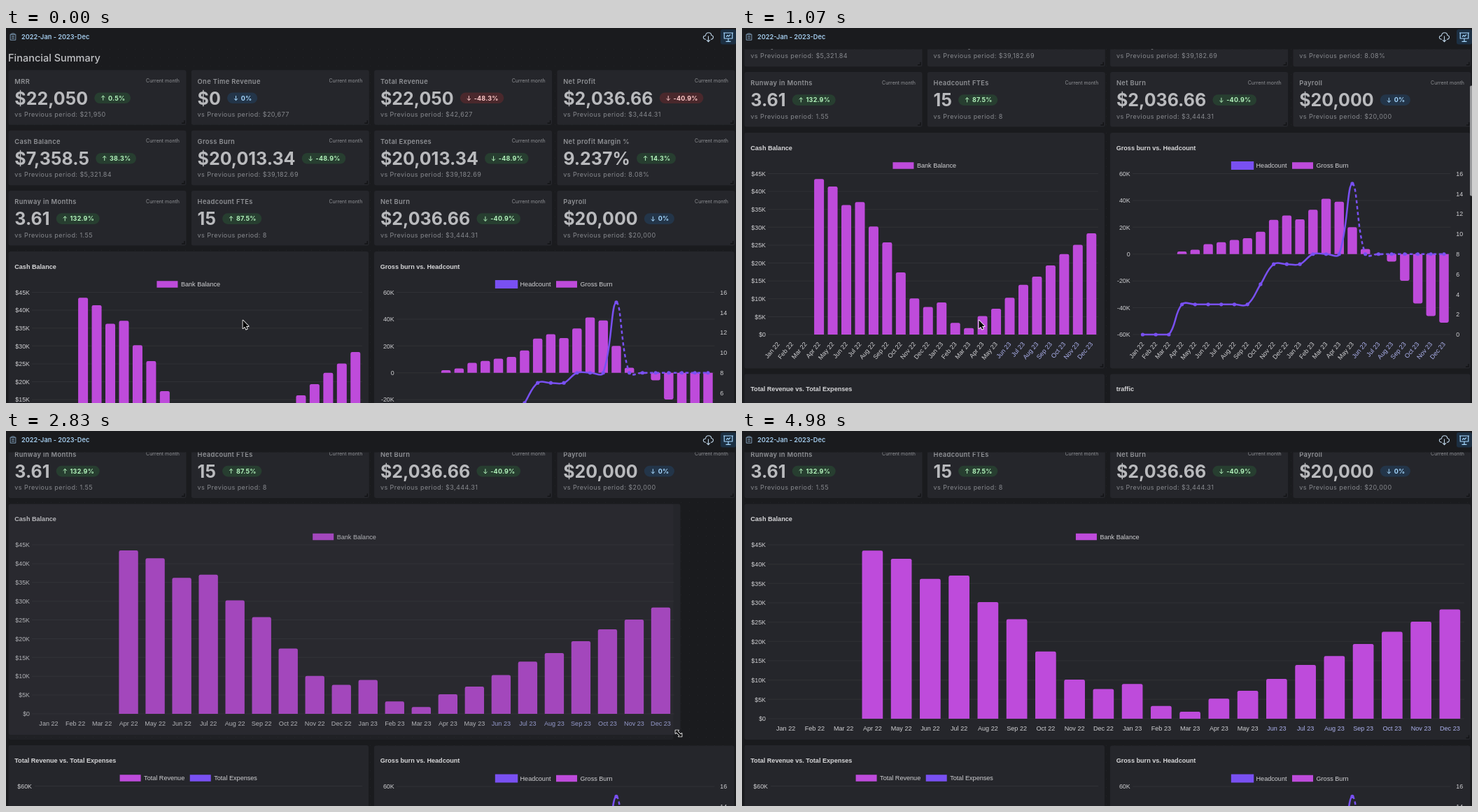
An HTML page with a canvas for the animation above (5540 ms loop, 1043x537 px).

```html
<!DOCTYPE html>
<html lang="en">
<head>
<meta charset="utf-8">
<title>Financial Summary</title>
<style>
  html, body { margin: 0; width: 100%; height: 100%; overflow: hidden; background: #1a1b1e; }
  canvas { display: block; width: 1043px; height: 537px; }
</style>
</head>
<body>
<canvas></canvas>
<script>
const W = 1043, H = 537, LOOP = 5540;
const GRAPE = '#be4bdb', VIOLET = '#7950f2', CARD = '#25262b', BG = '#1a1b1e';
const UI = 'Inter, sans-serif', CHART = '"Liberation Sans", Arial, sans-serif';
const COL = 87.1, GAP = 8, LEFT = 3.5, HEADER = 30.5, CHART_H = 337.5;

const canvas = document.querySelector('canvas');
const ctx = canvas.getContext('2d');
const dpr = window.devicePixelRatio || 1;
canvas.width = W * dpr;
canvas.height = H * dpr;

// Each step overrides only what changes at its start time.
const STEPS = [
  [0, { scroll: 0, bar: false, cursor: 'arrow', cx: 338.5, cy: 418.6, right: 518, height: CHART_H, active: false, push: 0 }],
  [540, { scroll: 2 }],
  [720, { scroll: 45, bar: true }],
  [890, { scroll: 107 }],
  [1070, { scroll: 170 }],
  [1250, { scroll: 203 }],
  [1430, { scroll: 215.5, cx: 474, cy: 452.6 }],
  [1610, { cx: 490.8, cy: 438.8 }],
  [1790, { cursor: 'resize', cx: 510, cy: 440 }],
  [1960, { bar: false }],
  [2140, { cx: 524, cy: 440, right: 531, active: true }],
  [2310, { cx: 702, cy: 438, right: 709.3, height: 335.5, push: 326.5 }],
  [2480, { push: 346 }],
  [2660, { cx: 922, cy: 447, right: 927, height: 344 }],
  [2830, { cx: 961, cy: 433, right: 963.5, height: 330.5 }],
  [3010, { cx: 997, cy: 439, right: 996 }],
  [3190, { cx: 1027, cy: 444, right: 1033, height: 337 }],
  [3370, { cx: 1030, cy: 445, right: 1036.3, height: CHART_H }],
  [4090, { cy: 440 }],
  [4270, { right: 1041, active: false }],
  [4810, { cursor: 'arrow', cx: 1026, cy: 468.8 }],
  [4980, { cursor: 'none' }],
];

const KPIS = [
  ['MRR', '$22,050', '↑', '0.5%', 'green', '$21,950'],
  ['One Time Revenue', '$0', '↓', '0%', 'blue', '$20,677'],
  ['Total Revenue', '$22,050', '↓', '-48.3%', 'red', '$42,627'],
  ['Net Profit', '$2,036.66', '↓', '-40.9%', 'red', '$3,444.31'],
  ['Cash Balance', '$7,358.5', '↑', '38.3%', 'green', '$5,321.84'],
  ['Gross Burn', '$20,013.34', '↓', '-48.9%', 'green', '$39,182.69'],
  ['Total Expenses', '$20,013.34', '↓', '-48.9%', 'green', '$39,182.69'],
  ['Net profit Margin %', '9.237%', '↑', '14.3%', 'green', '8.08%'],
  ['Runway in Months', '3.61', '↑', '132.9%', 'green', '1.55'],
  ['Headcount FTEs', '15', '↑', '87.5%', 'green', '8'],
  ['Net Burn', '$2,036.66', '↓', '-40.9%', 'green', '$3,444.31'],
  ['Payroll', '$20,000', '↓', '0%', 'blue', '$20,000'],
];
const PILL = {
  green: ['#273e30', '#b2f2bb'],
  blue: ['#233549', '#a5d8ff'],
  red: ['#4a282c', '#ffc9c9'],
};
const MONTHS = 'Jan Feb Mar Apr May Jun Jul Aug Sep Oct Nov Dec'.split(' ');
const LABELS = [22, 23].flatMap(year => MONTHS.map(m => `${m} ${year}`));
const FORECAST = 17;
const BALANCE = [0, 0, 0, 43.5, 41.4, 36.2, 37.05, 30.2, 25.75, 17.4, 10.1, 7.7,
  9, 3.3, 1.8, 5.2, 7.25, 10.3, 13.9, 16.2, 19.35, 22.5, 25.1, 28.3];
const BURN = [0, 0, 0, 2, 3.3, 7.4, 8.8, 10.6, 11.8, 16.6, 25.5, 28.7,
  25.9, 33, 41.3, 39, 20, 3.8, -0.8, -5.6, -19.9, -36.8, -46.2, -51.1];
const HEADCOUNT = [0, 0, 0, 3, 3, 3, 3, 3, 3, 5, 7, 7, 7, 8, 8, 8, 15, 8, 8, 8, 8, 8, 8, 8];

// y is the middle of the capital letters.
function text(str, x, y, size, color, { weight = 400, font = UI, align = 'left', spacing = 0 } = {}) {
  ctx.font = `${weight} ${size}px ${font}`;
  ctx.letterSpacing = `${spacing}px`;
  ctx.textAlign = align;
  ctx.fillStyle = color;
  ctx.fillText(str, x, y + size * 0.36);
  return ctx.measureText(str).width;
}

function box(x, y, w, h, color, radius = 0) {
  ctx.fillStyle = color;
  ctx.beginPath();
  ctx.roundRect(x, y, w, h, radius);
  ctx.fill();
}

function stroke(path, color, width = 1) {
  ctx.strokeStyle = color;
  ctx.lineWidth = width;
  ctx.stroke(new Path2D(path));
}

function card(x, y, w, h) {
  box(x, y, w, h, CARD, 3);
  const r = x + w - 2.5, b = y + h - 2.5;
  stroke(`M${r} ${b - 4}V${b}H${r - 4}`, 'rgba(0,0,0,.5)', 1.5);
}

function kpi([label, value, arrow, change, tone, previous], x, y) {
  card(x, y, 254, 78.5);
  text(label, x + 8.8, y + 16, 9.3, '#909296', { weight: 600, spacing: 0.36 });
  text('Current month', x + 244.5, y + 15, 7, '#909296', { align: 'right' });
  const width = text(value, x + 8.8, y + 40.2, 25, '#b9babd', { weight: 700 });
  const [fill, ink] = PILL[tone];
  const px = x + width + 18;
  ctx.font = `700 9px ${UI}`;
  ctx.letterSpacing = '.2px';
  box(px, y + 32.2, ctx.measureText(change).width + 27.5, 15.6, fill, 7.8);
  const ax = px + 12.5, ay = y + 40, d = arrow === '↑' ? -1 : 1;
  stroke(`M${ax} ${ay - 3.3 * d}V${ay + 3.3 * d}M${ax - 2.6} ${ay + 0.8 * d}L${ax} ${ay + 3.3 * d}L${ax + 2.6} ${ay + 0.8 * d}`, ink);
  text(change, px + 19.8, ay, 9, ink, { weight: 700, spacing: 0.2 });
  text(`vs Previous period: ${previous}`, x + 8.8, y + 63.5, 9, '#87898e', { spacing: 0.45 });
}

function legend(cx, y, items) {
  ctx.font = `9.1px ${CHART}`;
  ctx.letterSpacing = '0px';
  const widths = items.map(([name]) => ctx.measureText(name).width + 34.5);
  let x = cx - (widths.reduce((a, b) => a + b) + 7.5 * (items.length - 1)) / 2;
  items.forEach(([name, color, grow = 0], i) => {
    box(x - grow, y - 4.7 - grow, 30 + 2 * grow, 9.4 + 2 * grow, color);
    text(name, x + 34.5, y, 9.1, '#d0d0d3', { font: CHART });
    x += widths[i] + 7.5;
  });
}

function chartCard(x, y, w, h, title, items) {
  card(x, y, w, h);
  text(title, x + 8.7, y + 21.7, 9.1, '#d6d6d8', { weight: 700, font: CHART });
  legend(x + w / 2, y + 47, items);
}

function gridLine(label, x, y, from, to) {
  box(from, y - 0.5, to - from, 1, 'rgba(255,255,255,.05)');
  text(label, x, y, 8.9, '#cfcfd2', { font: CHART, align: 'right' });
}

function bars(values, left, step, zero, scale) {
  values.forEach((v, i) => {
    if (!v) return;
    const h = Math.abs(v) * scale, r = Math.min(2.4, h);
    box(left + (i + 0.14) * step, v > 0 ? zero - h : zero, step * 0.72, h, GRAPE, v > 0 ? [r, r, 0, 0] : [0, 0, r, r]);
  });
}

function labelAngle(step) {
  return step > 31.6 ? 0 : Math.min(50 * Math.PI / 180, Math.asin(15.5 / step));
}

function monthLabels(left, step, y) {
  const angle = labelAngle(step);
  LABELS.forEach((label, i) => {
    ctx.save();
    ctx.translate(left + (i + 0.5) * step, y + (angle ? 11.8 : 14));
    ctx.rotate(-angle);
    text(label, 0, 0, 9.1, i < FORECAST ? '#d0d0d3' : '#adb2ee', { font: CHART, align: angle ? 'right' : 'center' });
    ctx.restore();
  });
}

function cashChart(y, right, height) {
  chartCard(LEFT, y, right - LEFT, height, 'Cash Balance', [['Bank Balance', GRAPE]]);
  const left = 42, end = right - 9, step = (end - left) / 24;
  const top = y + 58.5, zero = y + height - 30 - 24.1 * Math.sin(labelAngle(step));
  for (let k = 0; k <= 45; k += 5) {
    gridLine(k ? `$${k}K` : '$0', 34, zero + (top - zero) * k / 45, 37, end);
  }
  bars(BALANCE, left, step, zero, (zero - top) / 45);
  monthLabels(left, step, zero);
}

function smoothLine(points, floor) {
  const controls = points.map((p, i) => {
    const a = points[i - 1] || p, b = points[i + 1] || p;
    const before = Math.hypot(p[0] - a[0], p[1] - a[1]);
    const after = Math.hypot(b[0] - p[0], b[1] - p[1]);
    const t = 0.4 / (before + after);
    const at = k => [p[0] + k * (b[0] - a[0]), Math.min(floor, p[1] + k * (b[1] - a[1]))];
    return [at(-t * before), at(t * after)];
  });
  ctx.strokeStyle = VIOLET;
  ctx.lineWidth = 2.5;
  const run = (from, to, dash) => {
    ctx.setLineDash(dash);
    ctx.beginPath();
    ctx.moveTo(...points[from]);
    for (let i = from + 1; i <= to; i++) {
      ctx.bezierCurveTo(...controls[i - 1][1], ...controls[i][0], ...points[i]);
    }
    ctx.stroke();
    ctx.setLineDash([]);
  };
  run(0, FORECAST - 1, []);
  run(FORECAST - 1, points.length - 1, [4.6, 3.8]);
  points.forEach(([x, y]) => box(x - 2.6, y - 2.6, 5.2, 5.2, VIOLET, 2.6));
}

function burnChart(y) {
  chartCard(526, y, 514.5, CHART_H, 'Gross burn vs. Headcount', [['Headcount', VIOLET, 1.2], ['Gross Burn', GRAPE]]);
  const left = 563.1, step = 18.72, end = left + 24 * step;
  const top = y + 58.5, bottom = y + 289, mid = (top + bottom) / 2, unit = (bottom - top) / 16;
  for (let k = -60; k <= 60; k += 20) {
    gridLine(k ? `${k}K` : '0', 554.7, mid - k * (bottom - top) / 120, 558, end);
  }
  for (let n = 0; n <= 16; n += 2) {
    text(n, 1020.3, bottom - n * unit, 8.9, '#cfcfd2', { font: CHART });
  }
  bars(BURN, left, step, mid, (bottom - top) / 120);
  smoothLine(HEADCOUNT.map((n, i) => [left + (i + 0.5) * step, bottom - n * unit]), bottom);
  monthLabels(left, step, bottom);
}

function lowerRow(y, showTraffic) {
  chartCard(LEFT, y, 514.5, CHART_H, 'Total Revenue vs. Total Expenses', [['Total Revenue', GRAPE], ['Total Expenses', VIOLET]]);
  gridLine('$60K', 37, y + 58.5, 41, 509);
  if (!showTraffic) return;
  chartCard(526, y, 514.5, CHART_H, 'traffic', [['Traffic by Referral', GRAPE]]);
  gridLine('600', 551, y + 58.5, 555, 1031);
  gridLine('500', 551, y + 82.5, 555, 1031);
  box(620.7, y + 69.3, 14.2, 200, GRAPE, 2.4);
}

function backdrop() {
  box(0, 0, W, H, BG);
  for (let y = 30; y < H; y += 12) {
    for (let x = 4; x < W; x += 12) box(x, y, 1, 1, '#222327');
  }
}

function header() {
  box(0, 0, W, HEADER - 4.5, BG);
  text('2022-Jan - 2023-Dec', 22, 13, 9.2, '#a5cdee', { weight: 600 });
  stroke('M7.5 9H6.2V17.2H13.8V9H12.5M8 8H12V10H8ZM8 12.5H12M8 14.8H12', '#7f9db8');
  stroke('M1000 16.2C995 16 995.5 11 999.5 11C1000 5.5 1007.5 5.5 1007.8 10.5C1012 11 1011 16.2 1007 16.2M1003.5 11.5V19.5M1001 17.2L1003.5 19.7L1006 17.2', '#bcd3e6', 1.1);
  box(1021, 2, 22, 21.5, '#1c2f42', 3);
  stroke('M1025 7H1039M1026.2 7V15H1037.8V7M1032 15V19M1028.5 19.3H1035.5M1029 12.5L1031 10.5L1032.5 12L1035 9.5', '#a5d8ff', 1.2);
}

const ARROW = new Path2D('M0 0V11.6L2.7 9.1L4.5 13L6.3 12.2L4.6 8.5H8.2Z');
const RESIZE = new Path2D('M-4.5 -4.5H0L-1.5 -3L3 1.5L4.5 0V4.5H0L1.5 3L-3 -1.5L-4.5 0Z');

function pointer({ cursor, cx, cy }) {
  if (cursor === 'none') return;
  const shape = cursor === 'arrow' ? ARROW : RESIZE;
  ctx.save();
  ctx.translate(cx, cy);
  ctx.strokeStyle = '#fff';
  ctx.lineWidth = 1.7;
  ctx.lineJoin = 'round';
  ctx.stroke(shape);
  ctx.fillStyle = '#000';
  ctx.fill(shape);
  ctx.restore();
}

function draw(s) {
  ctx.setTransform(dpr, 0, 0, dpr, 0, 0);
  backdrop();
  ctx.save();
  ctx.beginPath();
  ctx.rect(0, HEADER, W, H);
  ctx.clip();
  text('Financial Summary', 3, 43 - s.scroll, 14.5, '#c1c2c5', { weight: 500 });
  KPIS.forEach((item, i) => kpi(item, LEFT + (i % 4) * 3 * COL, 60.3 + Math.floor(i / 4) * 86.4 - s.scroll));
  const y = 320 - s.scroll;
  lowerRow(y + 345.5, !s.push);
  burnChart(y + s.push);
  cashChart(y, s.right, s.height);
  if (s.active) {
    const cols = Math.round((s.right - LEFT + GAP) / COL);
    box(LEFT, y, cols * COL - GAP, CHART_H, 'rgba(55,58,64,.2)', 3);
  }
  if (s.bar) box(1040, 32.4 + s.scroll * 0.295, 4, 158, '#9a9b9d', 2);
  ctx.restore();
  header();
  pointer(s);
}

const begin = performance.now();
let shown = -1;
function tick(now) {
  const t = Math.max(0, now - begin) % LOOP;
  const index = STEPS.findLastIndex(([start]) => start <= t);
  if (index !== shown) {
    shown = index;
    draw(Object.assign({}, ...STEPS.slice(0, index + 1).map(step => step[1])));
  }
  requestAnimationFrame(tick);
}
requestAnimationFrame(tick);
</script>
</body>
</html>
```
